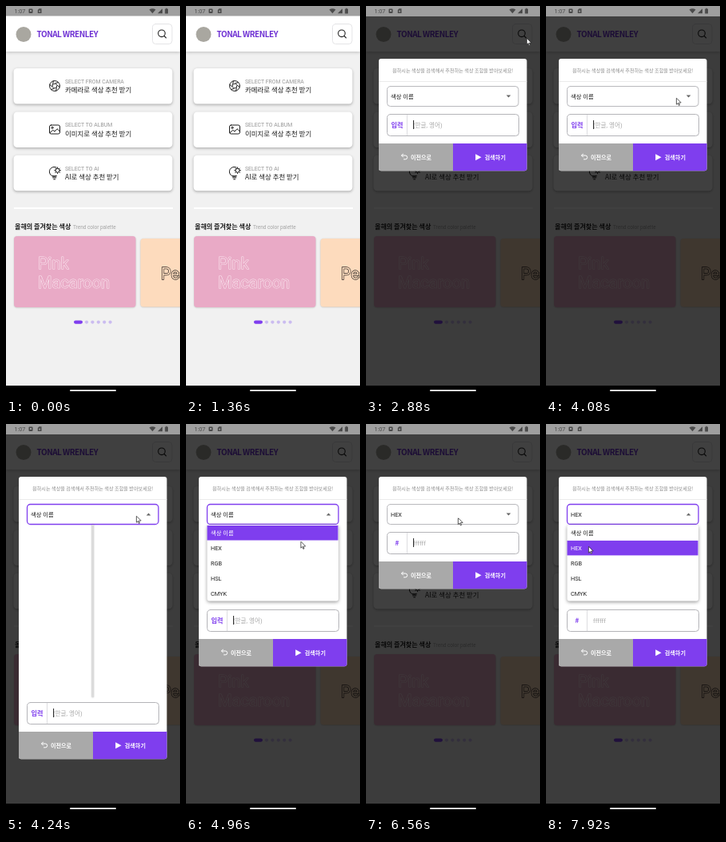
Write an HTML page with a canvas that moves like this. It is 218 by 488 pixels and loops after 8000 ms.

```html
<!DOCTYPE html>
<html lang="ko">
<head>
<meta charset="utf-8">
<title>Color search</title>
<style>
html, body { margin: 0; width: 100%; height: 100%; overflow: hidden; background: #f1f1f1; }
canvas { display: block; width: 218px; height: 488px; }
</style>
</head>
<body>
<canvas id="stage"></canvas>
<script>
const W = 218, H = 488, LOOP = 8000, STEP = 80;
const PURPLE = '#7f3eee', INK = '#1c1c1c';
const SANS = "Roboto, 'Noto Sans CJK KR', sans-serif";
const CJK = "'Noto Sans CJK KR', sans-serif";
const OPTIONS = ['색상 이름', 'HEX', 'RGB', 'HSL', 'CMYK'];

// [time, x, y] of the pointer
const POINTER = [
  [2000, 202, 44], [2240, 200, 38], [2400, 200, 38], [2640, 201, 39],
  [2800, 201, 39], [2880, 201, 40], [3200, 201, 40], [3680, 163, 115],
  [4560, 163, 115], [4960, 143.5, 147], [5120, 140, 154], [5280, 140, 154],
  [5920, 37, 155], [6160, 37, 155], [6560, 115, 117.5], [6960, 173, 113],
  [7440, 173, 113], [7920, 53, 153]
];
const CARET_FLIPS = [2880, 3440, 3920, 4400, 4880, 5360, 5840, 6160, 6400, 6880, 7320, 7840];

const canvas = document.getElementById('stage');
const ctx = canvas.getContext('2d');
const dpr = window.devicePixelRatio || 1;
canvas.width = W * dpr;
canvas.height = H * dpr;

function text(str, x, y, size, color, weight = 400, family = SANS, align = 'left') {
  ctx.font = `${weight} ${size}px ${family}`;
  ctx.fillStyle = color;
  ctx.textAlign = align;
  ctx.fillText(str, x, y);
}

function rect(x, y, w, h, color) {
  ctx.fillStyle = color;
  ctx.fillRect(x, y, w, h);
}

function box(x, y, w, h, r, fill, stroke, width = 1) {
  ctx.beginPath();
  ctx.roundRect(x, y, w, h, r);
  if (fill) { ctx.fillStyle = fill; ctx.fill(); }
  if (stroke) { ctx.strokeStyle = stroke; ctx.lineWidth = width; ctx.stroke(); }
}

function shadowed(blur, dy, color, draw) {
  ctx.save();
  ctx.shadowColor = color;
  ctx.shadowBlur = blur * dpr;
  ctx.shadowOffsetY = dy * dpr;
  draw();
  ctx.restore();
}

function dot(x, y, r, color) {
  ctx.beginPath();
  ctx.arc(x, y, r, 0, Math.PI * 2);
  ctx.fillStyle = color;
  ctx.fill();
}

function ring(x, y, r) {
  ctx.beginPath();
  ctx.arc(x, y, r, 0, Math.PI * 2);
  ctx.stroke();
}

function poly(points, fill) {
  ctx.beginPath();
  points.forEach(([x, y]) => ctx.lineTo(x, y));
  ctx.closePath();
  ctx.fillStyle = fill;
  ctx.fill();
}

function line(...points) {
  ctx.beginPath();
  points.forEach(([x, y]) => ctx.lineTo(x, y));
  ctx.stroke();
}

function pen(color, width) {
  ctx.strokeStyle = color;
  ctx.lineWidth = width;
  ctx.lineCap = ctx.lineJoin = 'round';
}

function statusBar() {
  rect(0, 0, W, 12.5, '#9f9f9f');
  const c = '#4b4b4b';
  text('1:07', 10.5, 9, 7.2, c);
  box(28.5, 3.5, 5, 5.5, 1, c);
  rect(30, 5, 2, 2, '#9f9f9f');
  poly([[41.5, 3.2], [44.5, 3.2], [44.5, 9], [39.8, 9], [39.8, 5]], c);
  rect(41.3, 5.6, 1.6, 2, '#9f9f9f');
  poly([[179.5, 4.6], [181.5, 3.5], [183.5, 3.2], [185.5, 3.5], [187.5, 4.6], [183.5, 9.2]], c);
  poly([[196, 3.2], [196, 9.2], [190, 9.2]], c);
  box(199.2, 3.5, 3.8, 6, .6, c);
  rect(200.3, 2.8, 1.6, 1, c);
}

function navBar() {
  rect(0, 475, W, 13, '#000');
  box(80, 480.2, 58, 1.8, .9, '#fff');
}

function header(hover) {
  shadowed(4, 1, 'rgba(0,0,0,.22)', () => rect(0, 12, W, 45, '#fff'));
  dot(22, 35.5, 9.5, '#a9a7a0');
  ctx.letterSpacing = '-0.5px';
  text('TONAL WRENLEY', 38.5, 39, 10, '#6d2fd3', 900, CJK);
  ctx.letterSpacing = '0px';
  box(183.5, 22.5, 24.5, 25, 4, hover ? PURPLE : '#fff', hover ? PURPLE : '#e1e1e4', .9);
  pen(hover ? '#fff' : INK, 1.1);
  ring(195, 34.3, 4.3);
  line([198.2, 37.5], [200.6, 39.9]);
}

function apertureIcon(x, y) {
  ring(x, y, 6.4);
  for (let i = 0; i < 6; i++) {
    const a = i * Math.PI / 3, b = a + 1.75;
    line([x + 2.6 * Math.cos(a), y + 2.6 * Math.sin(a)],
         [x + 6.4 * Math.cos(b - .45), y + 6.4 * Math.sin(b - .45)]);
  }
}

function imageIcon(x, y) {
  ctx.beginPath();
  ctx.roundRect(x - 6.5, y - 5.5, 13, 11, 2);
  ctx.stroke();
  ring(x - 3, y - 2.2, 1.1);
  line([x - 6, y + 4], [x - 2.2, y + .8], [x, y + 2.6], [x + 3, y - .8], [x + 6.3, y + 2.3]);
}

function bulbIcon(x, y) {
  ctx.beginPath();
  ctx.arc(x - .6, y - 1.5, 6, 5.2, 1.1, true);
  ctx.stroke();
  line([x - 3, y + 4], [x + 2.2, y + 4]);
  line([x - 2.6, y + 6], [x + 1.8, y + 6]);
  line([x - 1.4, y + 8], [x + .6, y + 8]);
  ring(x + 3.6, y - 3, 2.5);
  for (let i = 0; i < 8; i++) {
    const c = Math.cos(i * Math.PI / 4), s = Math.sin(i * Math.PI / 4);
    line([x + 3.6 + 2.8 * c, y - 3 + 2.8 * s], [x + 3.6 + 3.9 * c, y - 3 + 3.9 * s]);
  }
}

function menuCard(y, icon, small, label) {
  shadowed(3.5, 1.2, 'rgba(0,0,0,.3)', () => box(9.5, y, 199, 44.5, 4.5, '#fff'));
  pen(INK, 1);
  icon(61, y + 22);
  text(small, 74, y + 18.8, 6.88, '#969696');
  text(label, 74, y + 30, 8.45, INK, 500, CJK);
}

function outlined(str, x, y, fill, stroke, width) {
  ctx.font = `400 20px ${SANS}`;
  ctx.textAlign = 'left';
  pen(stroke, width);
  ctx.strokeText(str, x, y);
  ctx.fillStyle = fill;
  ctx.fillText(str, x, y);
}

function palette() {
  rect(10, 252, 199, 2, '#fff');
  text('올해의 즐겨찾는 색상', 11, 279, 8.05, INK, 700, CJK);
  text('Trend color palette', 84, 279, 6.45, '#a5a5a5');
  const shade = 'rgba(0,0,0,.2)';
  shadowed(2, .5, shade, () => box(10, 288, 152.5, 89, 4, '#e9aac6'));
  outlined('Pink', 40, 329, '#e9aac6', '#fbeaf2', 1.1);
  outlined('Macaroon', 40, 352.5, '#e9aac6', '#fbeaf2', 1.1);
  shadowed(2, .5, shade, () => box(168.5, 291, 60, 85.5, 4, '#fddbbd'));
  outlined('Peach', 194, 341.5, '#fddbbd', '#2a2522', 1.3);
  box(85, 393.5, 11, 4.2, 2.1, PURPLE);
  for (let i = 0; i < 5; i++) dot(101 + i * 7.4, 395.6, 2.1, '#cbbcf0');
}

function home(hover) {
  rect(0, 0, W, H, '#f1f1f1');
  header(hover);
  menuCard(78, apertureIcon, 'SELECT FROM CAMERA', '카메라로 색상 추천 받기');
  menuCard(132.5, imageIcon, 'SELECT TO ALBUM', '이미지로 색상 추천 받기');
  menuCard(186.8, bulbIcon, 'SELECT TO AI', 'AI로 색상 추천 받기');
  palette();
}

function optionList(picked) {
  shadowed(4, 1.5, 'rgba(0,0,0,.4)', () => box(26.5, 126, 164.5, 95.5, 3, '#fff'));
  OPTIONS.forEach((name, i) => {
    const y = 127 + i * 18.9, on = i === picked;
    if (on) rect(26.5, y, 164, 18.5, PURPLE);
    text(name, 31, y + 12, 7.3, on ? '#fff' : INK);
  });
}

function inputRow(y, hex, caret) {
  box(26.5, y, 165, 27, 4, '#fff', '#b4b4b8', 1);
  rect(51, y + .5, 1, 26, '#dddde0');
  text(hex ? '#' : '입력', 39, y + 16.6, 8.1, PURPLE, 700, CJK, 'center');
  text(hex ? 'ffffff' : '(한글, 영어)', 59, y + 16.4, 7.6, '#a8a8a8');
  if (caret) rect(59, y + 7.5, 1.1, 11, '#333');
}

function buttons(y) {
  ctx.save();
  ctx.beginPath();
  ctx.roundRect(16, y, 185.5, 34.3, [0, 0, 3, 3]);
  ctx.clip();
  rect(16, y, 93, 35, '#a9a9a9');
  rect(109, y, 93, 35, PURPLE);
  ctx.restore();
  pen('#fff', 1);
  line([46.5, y + 13], [44.5, y + 15], [46.5, y + 17]);
  ctx.beginPath();
  ctx.moveTo(44.7, y + 15);
  ctx.lineTo(49.3, y + 15);
  ctx.arc(49.3, y + 17.4, 2.4, -Math.PI / 2, Math.PI / 2);
  ctx.lineTo(47.5, y + 19.8);
  ctx.stroke();
  text('이전으로', 56, y + 19.8, 7.1, '#fff', 700, CJK);
  poly([[137.2, y + 13.2], [144.6, y + 17.2], [137.2, y + 21.2]], '#fff');
  text('검색하기', 148.8, y + 19.8, 7.1, '#fff', 700, CJK);
}

function dialog(t) {
  const hex = t >= 6160;
  const stretching = t >= 4240 && t < 4320;
  const open = (t >= 4240 && t < 6160) || t >= 7520;
  const shift = stretching ? 213 : open ? 97 : 0;
  const caret = CARET_FLIPS.filter(f => f <= t).length % 2 === 1;

  rect(0, 12.5, W, 462.5, 'rgba(0,0,0,.75)');
  box(16, 66, 185.5, 140.3 + shift, 3, '#fff');
  text('원하시는 색상을 검색해서 추천하는 색상 조합을 받아보세요!', 108.8, 82.5, 6.15, '#8b8b8b', 500, CJK, 'center');
  rect(16, 94, 185.5, .8, '#e6e6e6');

  box(26.5, 100.5, 164.5, 25, 4, '#fff', open ? PURPLE : '#b9b9bd', open ? 1.3 : 1);
  text(OPTIONS[hex ? 1 : 0], 31, 116, 7.3, INK);
  const d = open ? -1 : 1;
  poly([[175.8, 113 - 1.5 * d], [181.4, 113 - 1.5 * d], [178.6, 113 + 1.5 * d]], '#666');

  inputRow(135.5 + shift, hex, caret);
  buttons(172 + shift);
  if (stretching) {
    shadowed(2, 0, 'rgba(0,0,0,.3)', () => rect(107.6, 126, 2.2, 216, '#dcdcdc'));
  } else if (open) {
    optionList(hex ? 1 : 0);
  }
}

function pointer(t) {
  if (t < POINTER[0][0]) return;
  const i = POINTER.findIndex(k => k[0] > t);
  let [, x, y] = POINTER[POINTER.length - 1];
  if (i > 0) {
    const [t0, x0, y0] = POINTER[i - 1], [t1, x1, y1] = POINTER[i];
    const p = (t - t0) / (t1 - t0);
    x = x0 + (x1 - x0) * p;
    y = y0 + (y1 - y0) * p;
  }
  const shape = [[0, 0], [0, 7.8], [1.8, 6.2], [3, 9], [4.2, 8.5], [3, 5.8], [5.4, 5.6]]
    .map(([a, b]) => [x + a + .4, y + b + .4]);
  poly(shape, '#fff');
  pen('#333', .8);
  ctx.stroke();
}

function render(t) {
  ctx.setTransform(dpr, 0, 0, dpr, 0, 0);
  home(t >= 2000 && t < 2880);
  if (t >= 2880) dialog(t);
  statusBar();
  navBar();
  pointer(t);
}

const start = performance.now();
function tick() {
  const t = (performance.now() - start) % LOOP;
  render(Math.floor(t / STEP) * STEP);
  requestAnimationFrame(tick);
}
tick();
</script>
</body>
</html>
```
